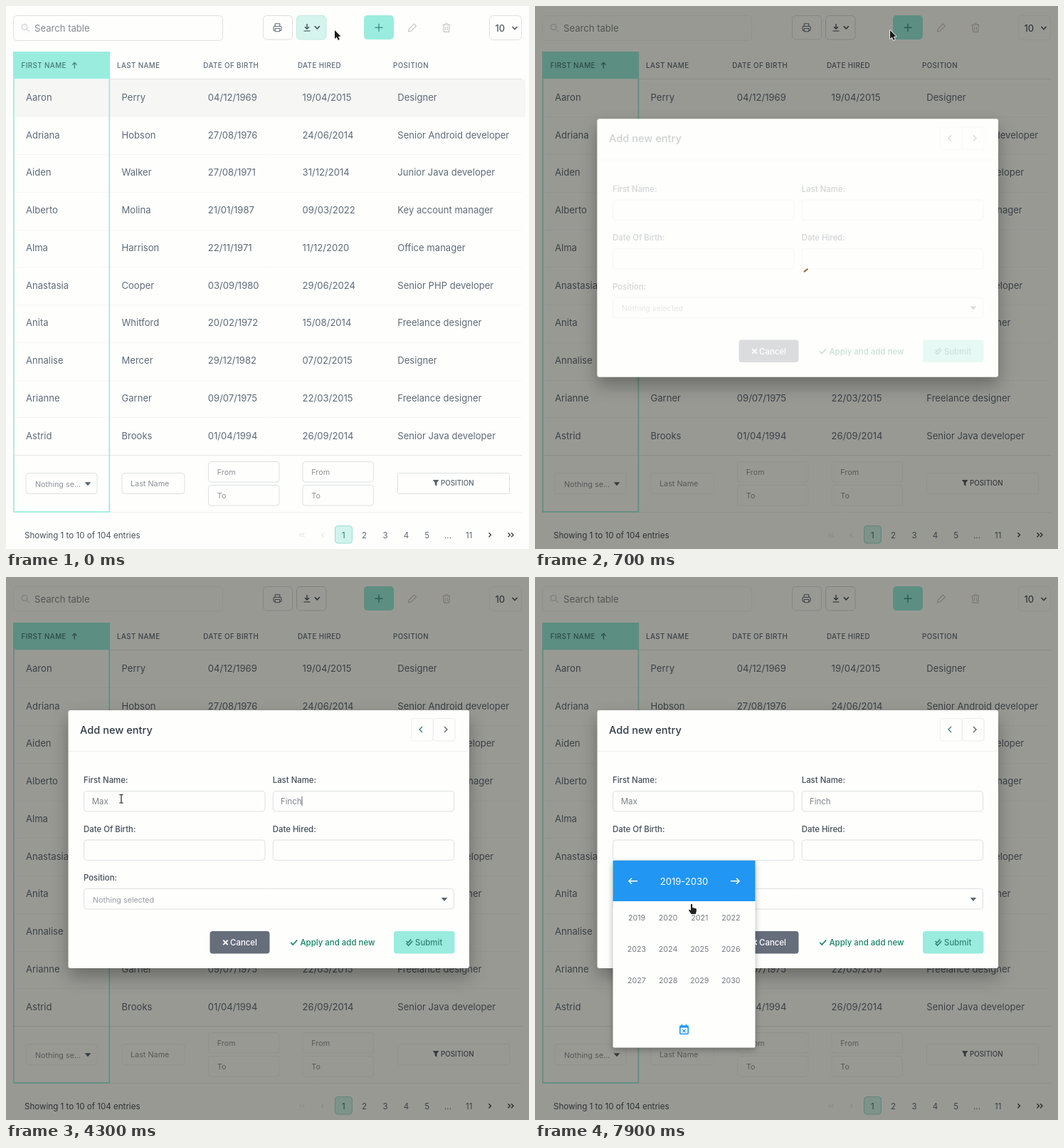
Animation, 735 px wide and 762 px high, one loop 8000 ms. Source, as an HTML page with a canvas:

```html
<!DOCTYPE html>
<html lang="en">
<head>
<meta charset="utf-8">
<title>Add new entry</title>
<style>
html, body { margin: 0; width: 100%; height: 100%; overflow: hidden; background: #fefefd; }
canvas { display: block; width: 735px; height: 762px; }
</style>
</head>
<body>
<canvas id="stage"></canvas>
<script>
const W = 735, H = 762, LOOP = 8000, STEP = 100;
const PAPER = '#fefefd', TEAL = '#9aecdf', INK = '#5d6b78', DARK = '#3a444e', GREEN = '#168267', BLUE = '#2196f3';
const canvas = document.getElementById('stage');
const g = canvas.getContext('2d');
const dpr = window.devicePixelRatio || 1;
canvas.width = W * dpr;
canvas.height = H * dpr;

const people = [
  ['Aaron', 'Perry', '04/12/1969', '19/04/2015', 'Designer'],
  ['Adriana', 'Hobson', '27/08/1976', '24/06/2014', 'Senior Android developer'],
  ['Aiden', 'Walker', '27/08/1971', '31/12/2014', 'Junior Java developer'],
  ['Alberto', 'Molina', '21/01/1987', '09/03/2022', 'Key account manager'],
  ['Alma', 'Harrison', '22/11/1971', '11/12/2020', 'Office manager'],
  ['Anastasia', 'Cooper', '03/09/1980', '29/06/2024', 'Senior PHP developer'],
  ['Anita', 'Whitford', '20/02/1972', '15/08/2014', 'Freelance designer'],
  ['Annalise', 'Mercer', '29/12/1982', '07/02/2015', 'Designer'],
  ['Arianne', 'Garner', '09/07/1975', '22/03/2015', 'Freelance designer'],
  ['Astrid', 'Brooks', '01/04/1994', '26/09/2014', 'Senior Java developer']
];
const columns = [28, 162.5, 283.8, 416.6, 550.3];

// time, x, y of the pointer's hot spot
const route = [
  [0, 462, 34], [100, 468, 33], [300, 509, 27], [600, 509, 27], [700, 499, 34],
  [800, 470, 60], [1300, 215, 262], [1600, 163, 311], [2000, 163, 311], [2100, 162, 311],
  [4600, 162, 311], [4900, 163, 309], [5100, 164, 325], [5500, 176, 377], [5900, 178, 384],
  [6300, 222, 423], [6700, 222, 423], [7100, 212, 425], [7700, 212, 425], [7900, 220, 459]
];

const clamp = v => Math.max(0, Math.min(1, v));
const ramp = (t, a, b) => clamp((t - a) / (b - a));
const within = (t, a, b) => t >= a && t < b;

function pointerAt(t) {
  let i = 1;
  while (i < route.length - 1 && route[i][0] < t) i++;
  const a = route[i - 1], b = route[i], k = ramp(t, a[0], b[0]);
  return [a[1] + (b[1] - a[1]) * k, a[2] + (b[2] - a[2]) * k];
}

function text(s, x, y, size, color, weight = 400, align = 'left', spacing = 0) {
  g.font = `${weight} ${size}px Inter, sans-serif`;
  g.textAlign = align;
  g.letterSpacing = spacing + 'px';
  g.fillStyle = color;
  g.fillText(s, x, y);
}

function box(x, y, w, h, r, fill, stroke, width = 1) {
  g.beginPath();
  g.roundRect(x, y, w, h, r);
  if (fill) { g.fillStyle = fill; g.fill(); }
  if (stroke) { g.strokeStyle = stroke; g.lineWidth = width; g.stroke(); }
}

function line(points, color, width = 1, closed = false) {
  g.beginPath();
  points.forEach(([x, y]) => g.lineTo(x, y));
  if (closed) g.closePath();
  g.strokeStyle = color;
  g.lineWidth = width;
  g.stroke();
}

function shape(points, color) {
  g.beginPath();
  points.forEach(([x, y]) => g.lineTo(x, y));
  g.fillStyle = color;
  g.fill();
}

const rule = (x1, x2, y, color) => line([[x1, y], [x2, y]], color);
const downTriangle = (x, y, color) => shape([[x - 4.3, y - 2.3], [x + 4.3, y - 2.3], [x, y + 2.7]], color);
const chevronDown = (x, y, color) => line([[x - 3.5, y - 2], [x, y + 1.7], [x + 3.5, y - 2]], color, 1.5);
const check = (x, y, color, s = 1) => line([[x - 4.5 * s, y], [x - 1.5 * s, y + 3 * s], [x + 4.5 * s, y - 3.5 * s]], color, 1.7);

// dir is 1 for right, -1 for left
const chevron = (x, y, dir, color, s = 3, width = 1.4) =>
  line([[x - dir * s / 2, y - s], [x + dir * s / 2, y], [x - dir * s / 2, y + s]], color, width);

function arrow(x, y, dir, color) {
  line([[x - 6 * dir, y], [x + 6 * dir, y]], color, 1.6);
  line([[x + 2 * dir, y - 4], [x + 6 * dir, y], [x + 2 * dir, y + 4]], color, 1.6);
}

function shadowed(blur, dy, alpha, paint) {
  g.save();
  g.shadowColor = `rgba(0,0,0,${alpha})`;
  g.shadowBlur = blur * dpr;
  g.shadowOffsetY = dy * dpr;
  paint();
  g.restore();
}

function toolbar(t, edge) {
  box(10.5, 13.5, 294, 35, 5, null, edge);
  g.beginPath();
  g.arc(26, 29.5, 4, 0, 7);
  g.strokeStyle = '#c3c7ca';
  g.lineWidth = 1;
  g.stroke();
  line([[29, 32.5], [33, 36.5]], '#c3c7ca');
  text('Search table', 40, 35.7, 13.1, '#858b91');

  box(361.5, 13.5, 41, 33.5, 5, PAPER, '#dcdfe1');
  box(376, 28.5, 11, 6, 1.5, null, '#5f6b75', 1.1);
  box(378.2, 24.7, 6.6, 3.8, .5, null, '#5f6b75', 1.1);
  box(378.2, 31.5, 6.6, 4.3, .5, PAPER, '#5f6b75', 1.1);

  const hovered = t < 300;
  box(408.5, 13.5, 41.5, 33.5, 5, hovered ? '#d5f4ee' : PAPER, hovered ? '#c3e9e2' : '#d3d8da');
  line([[423, 25], [423, 32]], DARK, 1.3);
  line([[420, 29.2], [423, 32.2], [426, 29.2]], DARK, 1.3);
  rule(418.5, 427.5, 35, DARK);
  chevronDown(437.3, 30.2, DARK);

  box(503, 13, 42, 34, 5, TEAL);
  line([[518.5, 30.3], [529.5, 30.3]], '#3a9585', 1.4);
  line([[524, 24.8], [524, 35.8]], '#3a9585', 1.4);

  const faint = '#cbc7c3';
  line([[565.5, 36], [566.5, 32], [573.5, 25], [576.5, 28], [569.5, 35]], faint, 1.2, true);
  rule(613.5, 624.5, 26.5, faint);
  line([[616.5, 26], [617.5, 24.5], [620.5, 24.5], [621.5, 26]], faint);
  line([[614.8, 27], [615.5, 36.3], [622.5, 36.3], [623.2, 27]], faint, 1.2);
  line([[617.5, 29], [617.5, 34]], faint);
  line([[620.5, 29], [620.5, 34]], faint);

  box(679.5, 13.5, 45, 34, 5, null, edge);
  text('10', 687.5, 35.8, 13.2, '#38424c');
  chevronDown(715, 31, '#44505a');
}

function table(t, edge) {
  g.globalAlpha = 1 - ramp(t, 0, 300);
  box(12, 103, 718, 53, 0, '#f6f6f5');
  g.globalAlpha = 1;
  box(10, 64, 136, 38.3, 0, TEAL);
  rule(146, 725, 102.5, '#e3e4e4');

  const heads = [['LAST NAME', 156], ['DATE OF BIRTH', 277.3], ['DATE HIRED', 410], ['POSITION', 544]];
  text('FIRST NAME', 21.5, 87, 9.8, '#467a76', 500, 'left', .4);
  heads.forEach(([s, x]) => text(s, x, 86.5, 9.8, INK, 500, 'left', .4));
  line([[96.3, 87.5], [96.3, 79.5]], '#467a76', 1.3);
  line([[93, 82.6], [96.3, 79.3], [99.6, 82.6]], '#467a76', 1.3);

  people.forEach((row, i) => {
    const y = 132.8 + 52.75 * i;
    row.forEach((s, c) => text(s, columns[c], y, 13.07, INK));
    if (i < 9) rule(12, 725, Math.round(y + 22.5) + .5, '#f6f6f6');
  });
  rule(10, 725, 630.5, '#e6e7e7');
  rule(146, 725, 710.5, '#f1f1f1');

  const soft = '#8b9197';
  box(28, 655.5, 100, 29, 4, null, edge);
  text('Nothing se...', 41, 674.7, 10.75, soft);
  downTriangle(115, 670.5, '#56616b');
  box(163, 655.5, 88, 29, 4, null, edge);
  text('Last Name', 175, 674.2, 10.8, soft);
  [284.5, 417].forEach(x => {
    ['From', 'To'].forEach((s, i) => {
      box(x, 639.5 + 33 * i, 99.5, 28.5, 4, null, edge);
      text(s, x + 12.3, 657.7 + 33.5 * i, 10.75, soft);
    });
  });
  box(550.5, 655.5, 157, 29, 2, null, edge);
  shape([[599.8, 665], [608.5, 665], [605.5, 669], [605.5, 673.5], [602.8, 672], [602.8, 669]], '#56616b');
  text('POSITION', 611, 673, 9.75, '#56616b', 500);

  box(10.9, 64.8, 134.4, 645, 0, null, TEAL, 1.7);
}

function footer() {
  text('Showing 1 to 10 of 104 entries', 26, 746.5, 11.6, '#47535d');
  box(462.5, 729.5, 24, 24.5, 4, '#d0f4ed', '#9bdcd1');
  text('1', 474.3, 746.5, 11.5, '#2b7f73', 400, 'center');
  [['2', 503.5], ['3', 533], ['4', 562.5], ['5', 591.7], ['...', 621], ['11', 650.7]]
    .forEach(([s, x]) => text(s, x, 746.5, 11.5, INK, 400, 'center'));
  [[414, -1], [418, -1], [445, -1]].forEach(([x, d]) => chevron(x, 742.3, d, '#d5d8da', 2.7, 1));
  [[680, 1], [707, 1], [711.5, 1]].forEach(([x, d]) => chevron(x, 742.3, d, DARK, 3));
}

function field(label, x, y, w) {
  text(label, x, y, 11.4, '#434e58', 500);
  box(x + .5, y + 11.5, w, 28.5, 4, null, '#dde0e2');
}

function button(x, w, fill, label, tx, color) {
  box(x, 497, w, 31.5, 4, fill);
  text(label, tx, 517.3, 11.45, color, 500);
}

function caret(x, y) {
  line([[x + .5, y], [x + .5, y + 13]], '#5a636b');
}

// each stop: time at which the given number of letters is present
function typed(word, t, stops) {
  let n = 0;
  stops.forEach(([at, count]) => { if (t >= at) n = count; });
  return word.slice(0, n);
}

function entry(s, x, t, showCaret) {
  text(s, x, 318.7, 11.4, '#7c838a');
  if (showCaret) caret(x + g.measureText(s).width, 308);
}

function modal(t) {
  const k = 1 - ramp(t, 650, 950);
  g.save();
  g.translate(0, -41 * k * k);
  shadowed(24, 12, .3, () => box(87.5, 187, 563.5, 362, 3, PAPER));

  text('Add new entry', 104, 219.7, 14.6, '#333c46', 500);
  box(569.5, 198.5, 30.5, 31.5, 3, null, '#eef0f0');
  box(600.5, 198.5, 30.5, 31.5, 3, null, '#e9ebec');
  chevron(583, 214, -1, '#3d7f83', 4);
  chevron(618, 214, 1, '#5d686f', 4);
  rule(88, 650, 244.5, '#eeefef');

  field('First Name:', 109, 289, 254.5);
  field('Last Name:', 374.7, 289, 254.5);
  field('Date Of Birth:', 109, 357.5, 254.5);
  field('Date Hired:', 374.7, 357.5, 254.5);
  field('Position:', 109, 426, 520);
  text('Nothing selected', 122, 456.5, 10.75, '#969ba0');
  downTriangle(616, 452.3, '#5d666e');

  button(286.5, 84, '#666d7b', 'Cancel', 315, '#fff');
  line([[305.3, 509.7], [311.7, 516.1]], '#fff', 1.9);
  line([[311.7, 509.7], [305.3, 516.1]], '#fff', 1.9);
  button(389, 140, null, 'Apply and add new', 413.5, GREEN);
  check(404.7, 513, GREEN);
  button(545, 85.5, TEAL, 'Submit', 575, '#358576');
  check(566, 511, '#358576', .75);
  check(567, 514.2, '#358576', .95);

  entry(typed('Max', t, [[2500, 1], [2800, 2], [3000, 3]]), 120.7, t, within(t, 1900, 3100));
  entry(typed('Finch', t, [[3700, 1], [3800, 3], [4300, 5]]), 386, t,
    within(t, 3100, 4800) || within(t, 5300, 5700));
  if (within(t, 5800, 6300) || within(t, 6800, 7500)) caret(120.5, 377);

  // loading veil
  g.globalAlpha = .77 * (1 - ramp(t, 900, 1400));
  box(87.5, 187, 563.5, 362, 3, PAPER);
  g.restore();

  if (t < 1000) {
    g.save();
    g.translate(367.5, 381);
    g.rotate(-.65 + (t - 700) / 160);
    line([[13, 0], [20, 0]], '#a8653f', 2);
    g.restore();
  }
}

function picker(t) {
  if (t < 5700) return;
  const days = t < 6500, years = t >= 7500;
  const w = days ? 230 : 200, h = days ? 330 : 262.5, mid = 109.5 + w / 2;
  g.save();
  g.globalAlpha = ramp(t, 5600, 5900);
  shadowed(9, 3, .3, () => box(109.5, 398, w, h, 2, PAPER));
  box(109.5, 398, w, 57, 0, BLUE);
  arrow(138, 426.7, -1, '#fff');
  arrow(81 + w, 426.7, 1, '#fff');
  text(days ? 'July 2024' : years ? '2019-2030' : '2024', mid, 431.5, 13, '#fff', 400, 'center');

  const cell = (s, x, y) => text(s, x, y, 10.7, '#747b80', 400, 'center');
  if (days) {
    [...'MTWTFSS'].forEach((s, i) => cell(s, 134 + 30 * i, 481));
    for (let d = 1; d <= 31; d++) cell(d, 134 + 30 * ((d - 1) % 7), 516 + 35 * Math.floor((d - 1) / 7));
  } else {
    const months = 'Jan Feb Mar Apr May Jun Jul Aug Sep Oct Nov Dec'.split(' ');
    months.forEach((m, i) =>
      cell(years ? 2019 + i : m, 143 + 44.1 * (i % 4), 481.7 + 44 * Math.floor(i / 4)));
  }

  const y = days ? 702.5 : 635;
  box(mid - 5.7, y - 5, 11.4, 11.3, 1, null, BLUE, 1.6);
  box(mid - 5.7, y - 5, 11.4, 2.5, 0, BLUE);
  [-3, 3].forEach(d => line([[mid + d, y - 7.5], [mid + d, y - 4]], BLUE, 1.5));
  line([[mid - 2, y], [mid + 2, y + 4]], BLUE, 1.3);
  line([[mid + 2, y], [mid - 2, y + 4]], BLUE, 1.3);
  g.restore();
}

function pointer(t) {
  const [x, y] = pointerAt(t);
  g.save();
  g.translate(x, y);
  g.lineJoin = 'round';
  const overField = x > 109 && x < 364 && ((y > 300 && y < 329) || (y > 369 && y < 398));
  if (t >= 1400 && overField) {
    const bar = [[0, -5], [0, 6]];
    line(bar, '#fff', 3);
    line(bar, '#333', 1.3);
    [-5.5, 6].forEach(d => line([[-2.7, d], [2.7, d]], '#333', 1.2));
  } else if (t >= 5700 && y > 398) {
    const hand = [[-1, 0], [1, 0], [1.2, 5], [6.5, 6.2], [7, 9], [5.8, 14], [-.5, 14], [-4, 8.7], [-3, 7.5], [-1, 9]];
    line(hand, '#fff', 1.6, true);
    shape(hand, '#222');
  } else {
    const tip = [[0, 0], [0, 12], [2.8, 9.6], [4.8, 14], [6.8, 13], [4.9, 8.9], [8.5, 8.6]];
    line(tip, '#fff', 1.6, true);
    shape(tip, '#1c1c1c');
  }
  g.restore();
}

function draw(t) {
  const dim = t >= 500;
  const edge = dim ? '#f2f2f1' : '#dee0e2';
  g.setTransform(dpr, 0, 0, dpr, 0, 0);
  g.fillStyle = PAPER;
  g.fillRect(0, 0, W, H);
  toolbar(t, edge);
  table(t, edge);
  footer();
  if (dim) {
    g.globalCompositeOperation = 'multiply';
    g.fillStyle = '#9a9a95';
    g.fillRect(0, 0, W, H);
    g.globalCompositeOperation = 'source-over';
  }
  if (t >= 600) modal(t);
  picker(t);
  pointer(t);
}

const start = performance.now();
function tick() {
  const t = (performance.now() - start) % LOOP;
  draw(Math.floor(t / STEP) * STEP);
  requestAnimationFrame(tick);
}
tick();
</script>
</body>
</html>
```
